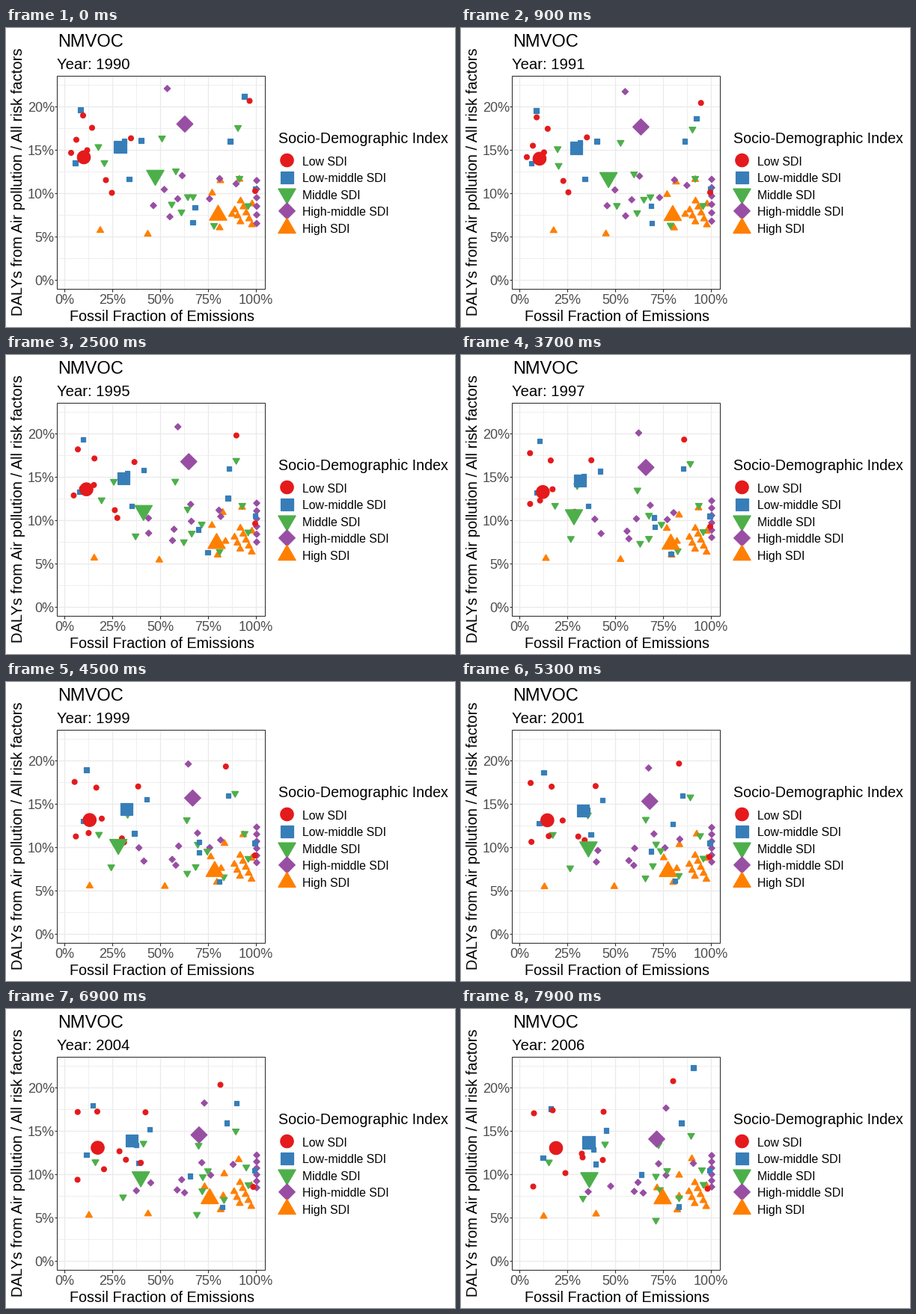
These frames come from a looping animation (600 px wide and 400 px high, 8000 ms). A matplotlib script:

```python
import numpy as np
import matplotlib.pyplot as plt
from matplotlib.animation import FuncAnimation
from matplotlib.patches import Polygon, Rectangle

W, H = 600, 400
PX = 0.72  # points per pixel at 100 dpi
STEPS = 38
LEFT, TOP, RIGHT, BOTTOM = 68, 64, 346, 349

plt.rcParams["font.family"] = "Liberation Sans"
fig = plt.figure(figsize=(W / 100, H / 100), dpi=100, facecolor="white")
ax = fig.add_axes([0, 0, 1, 1])
ax.set(xlim=(0, W), ylim=(H, 0))
ax.axis("off")


def text(x, y, s, size, color="black", **kw):
    return ax.text(x, y, s, fontsize=size * PX, color=color, va="baseline", **kw)


def line(x0, y0, x1, y1, width, color):
    ax.plot([x0, x1], [y0, y1], color=color, lw=width * PX,
            solid_capstyle="butt", zorder=1)


# Marker outlines around their own centre
turn = np.linspace(0, 2 * np.pi, 40, endpoint=False)
disc = np.column_stack([np.cos(turn), np.sin(turn)])
square = 0.93 * np.array([(-1, -1), (1, -1), (1, 1), (-1, 1)])
diamond = 1.25 * np.array([(0, -1), (1, 0), (0, 1), (-1, 0)])
up = np.array([(0, -1.17), (1.35, 1.17), (-1.35, 1.17)])
down = up * (1, -1)

SMALL, BIG = 3.4, 8.7
HIGH = ("High SDI", up, "#FF7F00")
HIGH_MID = ("High-middle SDI", diamond, "#984EA3")
MID = ("Middle SDI", down, "#4DAF4A")
LOW_MID = ("Low-middle SDI", square, "#377EB8")
LOW = ("Low SDI", disc, "#E41A1C")


def marker(kind, x, y, radius):
    _, shape, color = kind
    patch = Polygon(shape * radius + (x, y), closed=True, fc=color, ec=color,
                    lw=1.2 * PX, joinstyle="miter", zorder=10 + radius)
    return ax.add_patch(patch)


# Panel, grid and ticks
for i in range(9):
    x = 78 + 32 * i
    line(x, TOP, x, BOTTOM, 0.8 if i % 2 else 1.4, "#EBEBEB")
    if i % 2 == 0:
        line(x, BOTTOM, x, BOTTOM + 4, 1.2, "#333333")
        text(x, 369, f"{i * 25 // 2}%", 18, "#4D4D4D", ha="center")
for i in range(10):
    y = 337 - 29 * i
    line(LEFT, y, RIGHT, y, 0.8 if i % 2 else 1.4, "#EBEBEB")
    if i % 2 == 0:
        line(LEFT - 3, y, LEFT, y, 1.2, "#333333")
        text(64.8, y + 6.5, f"{i * 5 // 2}%", 18, "#4D4D4D", ha="right")
ax.add_patch(Rectangle((LEFT, TOP), RIGHT - LEFT, BOTTOM - TOP,
                       fc="none", ec="#333333", lw=1.1 * PX, zorder=40))

# Labels and legend
text(68.8, 24.8, "NMVOC", 23.6)
year = text(68.5, 55, "", 20.3)
text(208.3, 391.8, "Fossil Fraction of Emissions", 19.8, ha="center")
text(22.5, 206, "DALYs from Air pollution / All risk factors", 20.1,
     ha="center", rotation=90, rotation_mode="anchor")
text(363.5, 153.5, "Socio-Demographic Index", 19.6)
for i, kind in enumerate((LOW, LOW_MID, MID, HIGH_MID, HIGH)):
    y = 177 + 22.6 * i
    shift = {MID[0]: 3, HIGH[0]: -3}.get(kind[0], 0)
    marker(kind, 375.5, y + shift, BIG)
    text(396, y + 6.7, kind[0], 15.9)

dots = []


def dot(kind, *stops, radius=SMALL):
    """Add a marker that visits its stops at an even pace."""
    when = np.linspace(0, STEPS, len(stops))
    xs, ys = np.transpose(stops)
    k = np.arange(STEPS + 1)
    track = np.column_stack([np.interp(k, when, xs), np.interp(k, when, ys)])
    dots.append((marker(kind, *track[0], radius), kind[1] * radius, track))


# Richest regions crowd the fossil end in an even scatter
for j in range(9):
    x, y = 303 + 27 * ((0.39 + 0.57 * j) % 1), 230 + 4 * j
    dot(HIGH, (x, y), (x - 1, y + 1))
dot(HIGH, (126, 269.5), (112, 271), (110.5, 276))
dot(HIGH, (189.5, 274.5), (216, 272), (180.5, 273))
dot(HIGH, (275.5, 219.5), (275, 232), (262, 238))
dot(HIGH, (286.5, 203), (292, 214), (291.5, 221))
dot(HIGH, (312, 201), (318, 203.5), (308.5, 199))
dot(HIGH, (302, 248), (287, 248), (291.5, 249))
dot(HIGH, (285.5, 266), (281, 266.5), (289, 267.5))
dot(HIGH, (283.5, 247), (280, 250), (269.5, 250.5), radius=BIG)

# A column pinned at 100 %
for j in range(6):
    dot(HIGH_MID, (335, 204 + 11.5 * j), (335, 194 + 9.6 * j), (335, 196 + 8.4 * j))
dot(HIGH_MID, (215.5, 81), (240, 107), (274, 132.5))
dot(HIGH_MID, (235.5, 197.5), (255, 201.5), (264, 207))
dot(HIGH_MID, (211.5, 216), (175, 220), (200, 237))
dot(HIGH_MID, (197, 237.5), (186, 239), (170, 244.5))
dot(HIGH_MID, (229.5, 228.5), (221, 236.5), (231.5, 244))
dot(HIGH_MID, (219, 252.5), (225, 245), (243.5, 246))
dot(HIGH_MID, (272, 228.5), (230, 218), (236.5, 232))
dot(HIGH_MID, (285.5, 201.5), (284, 212), (310.5, 206.5))
dot(HIGH_MID, (307.5, 208.5), (272, 221.5), (274, 222.5))
dot(HIGH_MID, (239, 128.5), (248, 153), (261.5, 174), radius=BIG)

dot(MID, (123.5, 160), (159, 178), (192.5, 182))
dot(MID, (131.5, 181.5), (125, 205), (117.5, 206))
dot(MID, (208.5, 148.5), (239, 186), (264, 183))
dot(MID, (227, 192.5), (254, 218.5), (275.5, 217.5))
dot(MID, (221.5, 237), (138, 248), (163, 254.5))
dot(MID, (243, 227), (252, 249), (266, 243))
dot(MID, (250, 227), (270, 228), (260.5, 225))
dot(MID, (234.5, 247.5), (240, 254), (260.5, 284))
dot(MID, (278, 265.5), (291, 263), (291.5, 254))
dot(MID, (310, 134.5), (306, 148), (307.5, 170.5))
dot(MID, (312, 202.5), (318.5, 202.5), (322, 216.5))
dot(MID, (323.5, 239), (324, 236))
dot(MID, (199.5, 200.5), (192, 210), (140, 219), (188, 227), (171.5, 229), radius=BIG)

dot(LOW_MID, (99.5, 109.5), (106, 115.5), (120, 133.5))
dot(LOW_MID, (92.5, 180.5), (102, 184.5), (109.5, 199))
dot(LOW_MID, (158, 151), (165, 164), (177, 188))
dot(LOW_MID, (180.5, 150.5), (187, 156), (194, 162.5))
dot(LOW_MID, (164.5, 202), (170.5, 202), (180, 207.5))
dot(LOW_MID, (249.5, 260), (284, 267), (291, 264.5))
dot(LOW_MID, (252.5, 240), (260, 229), (241, 221.5))
dot(LOW_MID, (299.5, 151.5), (294.5, 152.5))
dot(LOW_MID, (318.5, 91.5), (306, 185), (245, 226), (305.5, 169), (310.5, 78.5))
dot(LOW_MID, (333, 215), (332, 216))
dot(LOW_MID, (152.5, 159), (160, 169), (170.5, 178.5), radius=BIG)

dot(LOW, (87, 167), (93, 203), (96.5, 237.5))
dot(LOW, (94, 149.5), (107, 200), (139.5, 219.5))
dot(LOW, (103, 117), (91, 133), (97.5, 139.5))
dot(LOW, (115, 133.5), (120.5, 142), (122.5, 135.5))
dot(LOW, (108.5, 163.5), (124, 181.5), (161.5, 193.5))
dot(LOW, (133.5, 203.5), (154, 210.5), (162.5, 198.5))
dot(LOW, (141.5, 220.5), (154, 216), (189.5, 202))
dot(LOW, (167, 147.5), (175, 140), (190.5, 137.5))
dot(LOW, (325.5, 97.5), (295, 115), (283.5, 96.5))
dot(LOW, (333, 218), (333, 231), (329.5, 240.5))
dot(LOW, (104, 173), (110, 184.5), (127, 186), radius=BIG)


def draw(i):
    k = max(0, (i - 3) // 2)
    year.set_text(f"Year: {round(1990 + 29 / 69 * k)}")
    for patch, shape, track in dots:
        patch.set_xy(shape + track[k])
    return [year] + [d[0] for d in dots]


anim = FuncAnimation(fig, draw, frames=80, interval=100, repeat=True,
                     repeat_delay=0, blit=False)
plt.show()
```
